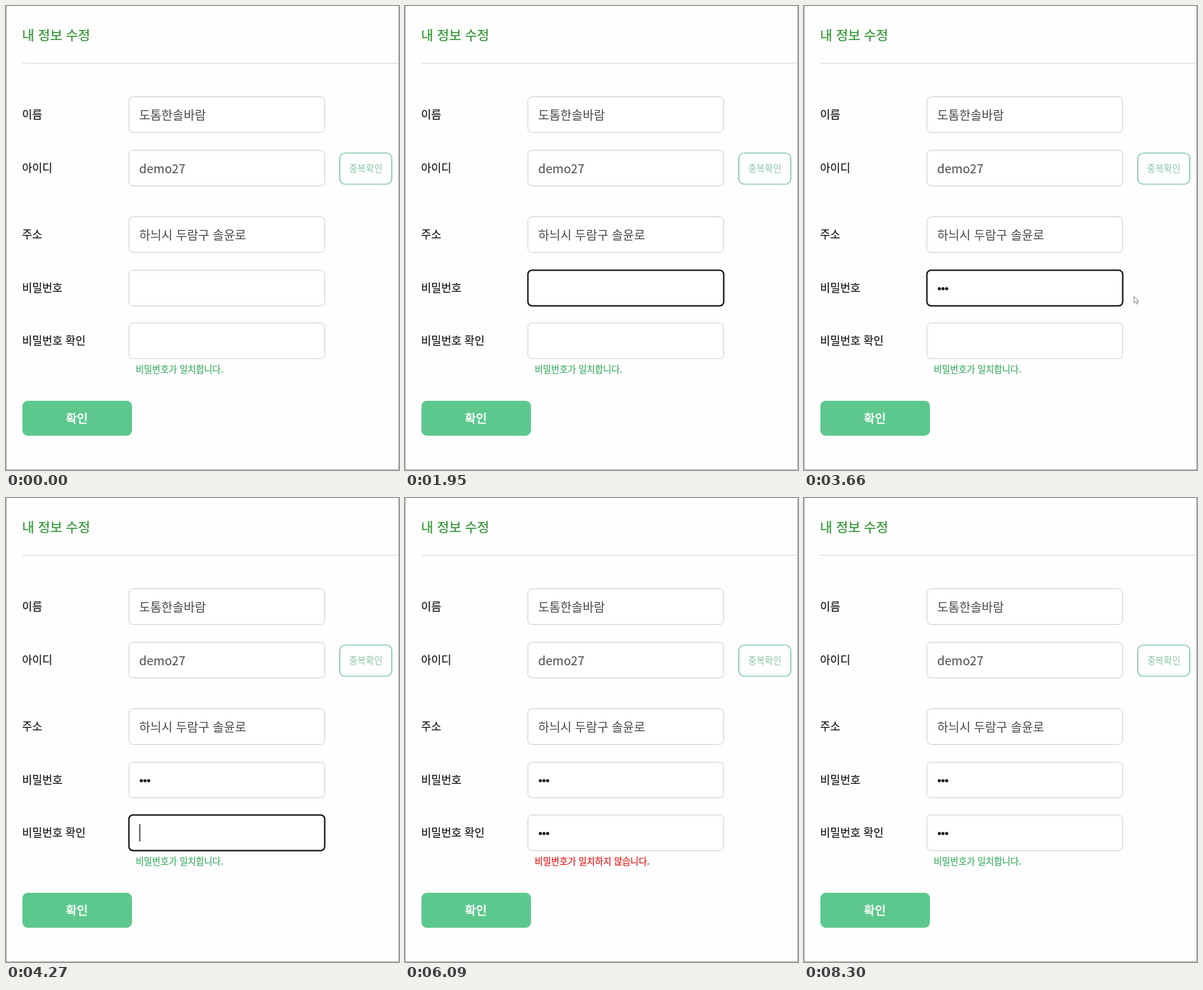
Animation, 574 px wide and 677 px high, one loop 8970 ms. Source, as an HTML page:

```html
<!DOCTYPE html>
<html lang="ko">
<head>
<meta charset="utf-8">
<style>
  html, body { margin: 0; width: 100%; height: 100%; overflow: hidden; background: #fefefe; }
  svg { display: block; font-family: "Noto Sans CJK KR", "Noto Sans CJK", "Noto Sans CJK JP", sans-serif; }
  .label { font-size: 16px; fill: #111; stroke: #111; stroke-width: .15; }
  .value { font-size: 17.7px; font-weight: 300; fill: #484848; }
  .field { fill: #fff; stroke: #cfcfd3; }
  .field.focus { stroke: #080808; stroke-width: 2; }
  #hint { font-size: 13.1px; fill: #45b06a; stroke: #45b06a; stroke-width: .25; }
  #hint.wrong { fill: #e51c1c; stroke: #e51c1c; }
</style>
</head>
<body>
<svg width="574" height="677" viewBox="0 0 574 677">
  <path d="M.5 0V676.5H573.5V0" fill="none" stroke="#adadad"/>
  <text x="23.5" y="49.5" font-size="19.3" fill="#2c922f" stroke="#2c922f" stroke-width=".2">내 정보 수정</text>
  <path d="M24 83.5H573" stroke="#d9d9d9"/>
  <g id="form"></g>
  <rect x="487.5" y="214.5" width="76" height="45.5" rx="8" fill="#fff" stroke="#62bb8b" stroke-width="1.2"/>
  <text x="525.5" y="242.3" font-size="13.2" font-weight="300" fill="#86c5a3" text-anchor="middle">중복확인</text>
  <text id="hint" x="189.5" y="535.3"></text>
  <rect x="24" y="576" width="160" height="51" rx="8" fill="#5dc88e"/>
  <text x="103.5" y="608.4" font-size="17.4" fill="#fff" stroke="#fff" stroke-width=".5" text-anchor="middle">확인</text>
  <path id="caret" stroke="#000" stroke-width="1.2"/>
  <path id="mouse" d="M0 0V10L2.3 8L4 11.5L5.6 10.7L4 7.3H7Z" fill="#fff" stroke="#777" stroke-width=".9"/>
</svg>
<script>
const LOOP = 8970;
const $ = id => document.getElementById(id);
const clamp = (v, lo, hi) => Math.min(hi, Math.max(lo, v));
const within = (t, from, to) => t >= from && t < to;

const rows = [
  ['이름', '도톰한솔바람'],
  ['아이디', 'demo27'],
  ['주소', '하늬시 두람구 솔윤로'],
  ['비밀번호', ''],
  ['비밀번호 확인', '']
];
const rowTop = i => Math.round(132 + 77.5 * i + (i > 1 ? 20 : 0));
const dotY = i => rowTop(i) + 27.5;

$('form').innerHTML = rows.map(([label, value], i) => {
  const y = rowTop(i);
  const dots = value ? '' : [0, 1, 2].map(n =>
    `<circle class="dot" cx="${197.7 + 5.3 * n}" cy="${dotY(i)}" r="2.3"/>`).join('');
  return `
    <text class="label" x="23.5" y="${y + 32.4}">${label}</text>
    <rect class="field" x="179.5" y="${y + .5}" width="286" height="52" rx="6"/>
    <text class="value" x="194.5" y="${y + 33.7}">${value}</text>${dots}`;
}).join('');

const fields = [...document.querySelectorAll('.field')].slice(3);
const marks = [...document.querySelectorAll('.dot')];

// three characters at a steady pace
const typed = (t, start, gap) => clamp(Math.floor((t - start) / gap) + 1, 0, 3);

const ERASE = 6900, RETYPE = 7610;

function formState(t) {
  const first = typed(t, 2450, 305);
  const second = typed(t, 4850, 285) - within(t, ERASE, RETYPE);
  const focus = within(t, 1400, 4270) ? 1
    : within(t, 4270, 5900) || within(t, 6650, 8130) ? 2 : 0;
  return { counts: [first, second], focus, wrong: second > 0 && t < RETYPE };
}

// the arrow slips out of a field, rests at (x, y) and slips back
function visit(t, middle, x, y) {
  const left = 370 - Math.abs(t - middle);
  if (left < 0) return null;
  const k = clamp(left / 250, 0, 1), away = 1 - k * k * (3 - 2 * k);
  return [x + (466 - x) * away, y + 3 * away];
}

function draw(now) {
  const t = now % LOOP;
  const { counts, focus, wrong } = formState(t);

  fields.forEach((f, i) => f.classList.toggle('focus', focus === i + 1));
  marks.forEach((m, i) => m.style.display = i % 3 < counts[i / 3 | 0] ? '' : 'none');

  $('hint').textContent = wrong ? '비밀번호가 일치하지 않습니다.' : '비밀번호가 일치합니다.';
  $('hint').classList.toggle('wrong', wrong);

  const caretOn = focus && (t + 40) % 1000 < 470;
  $('caret').setAttribute('d', caretOn
    ? `M${195.5 + 5.4 * counts[focus - 1]} ${dotY(focus + 2) - 13.5}v25` : '');

  const at = visit(t, 3770, 482, 423.5) || visit(t, 7440, 472, 513);
  $('mouse').style.display = at ? '' : 'none';
  if (at) $('mouse').setAttribute('transform', `translate(${at})`);
  requestAnimationFrame(draw);
}
draw(0);
</script>
</body>
</html>
```
